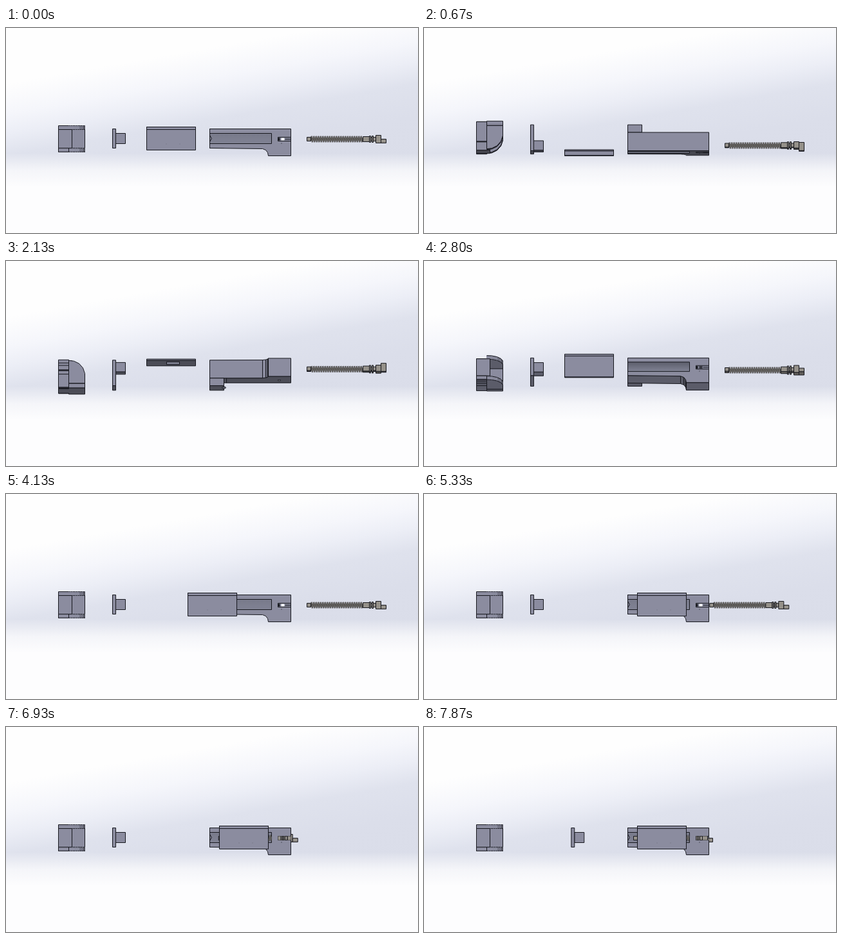
Recreate the animation shown at these times as an HTML page with a canvas. Size 640 by 320 pixels, loop 8000 ms.

```html
<!DOCTYPE html>
<html lang="en">
<head>
<meta charset="utf-8">
<title>Exploded assembly</title>
<style>
html, body { margin: 0; width: 100%; height: 100%; overflow: hidden; }
body {
  background:
    linear-gradient(180deg, #fdfdfe00 195px, #fdfdfebb 222px, #fdfdfe 248px),
    linear-gradient(170deg, #fefefe 20%, #f5f6fb 31%, #eceef6 38%, #dfe2ed 46%, #dbdeea 58%, #d9dce8 100%);
}
canvas { display: block; }
</style>
</head>
<body>
<canvas id="stage" width="640" height="320"></canvas>
<script>
const ctx = document.getElementById('stage').getContext('2d');
const STEP = 8000 / 60, AXIS = 175.5, INK = '#17181e';
const STEEL = [149, 151, 171], BRASS = [160, 156, 148];
let cos = 1, sin = 0;

// The parts turn about a horizontal axis; z points at the viewer.
const py = (y, z) => AXIS + (y + 0.5) * cos + z * sin;
const pz = (y, z) => z * cos - (y + 0.5) * sin;

// Faces of a polygon extruded along z (polygon in x,y) or y (polygon in x,z).
function prism(poly, near, far, axis = 'z', smooth = false) {
  const at = ([x, u], v) => axis === 'z' ? [x, u, v] : [x, v, u];
  const faces = [
    { pts: poly.map(p => at(p, near)) },
    { pts: poly.map(p => at(p, far)).reverse() }
  ];
  poly.forEach((p, i) => {
    const q = poly[(i + 1) % poly.length];
    faces.push({ pts: [at(q, near), at(p, near), at(p, far), at(q, far)], smooth });
  });
  return faces;
}
const box = (x0, x1, y0, y1, z0, z1) =>
  prism([[x0, y0], [x1, y0], [x1, y1], [x0, y1]], z1, z0);

const curve = [[97, -20], [122, -20], [122, -4], [119, 5], [113, 12], [105, 16], [97, 17]];
const cap = [
  prism([[81, -18], [97, -18], [97, -24], [122, -24], [122, 17], [97, 17], [97, 11], [81, 11]],
    -20, -27),
  prism(curve, -24, -18, 'y', true),
  box(81, 102, -18, 11, -20, 18),
  prism(curve, 11, 17, 'y', true),
  box(81, 97, -24, -18, -26, 5),
  box(81, 97, 11, 17, 13, 18),
  box(81, 97, 11, 17, 2, 9),
  box(81, 97, 11, 17, -26, -5)
].flat();
const plug = [box(165, 170, -19, 11, -22, 19), box(170, 185, -12, 4, 2, 17)].flat();
const sleeve = [box(218, 294, -22, 14, 18, 20), box(218, 294, -22, -18, 20, 27)].flat();
const body = [
  prism([[316, -19], [442, -19], [442, 23], [407, 23], [406, 18], [403, 14],
    [398, 12], [316, 11]], 19, -10),
  box(316, 338, -19, 11, -22, -10)
].flat();
const pin = [
  box(467, 473, -6, 0, 5, 11),
  box(554, 564, -7, 1, 4, 12),
  box(564, 566, -8, 2, 3, 13),
  box(566, 568, -6, 0, 5, 11),
  box(568, 570, -8, 2, 3, 13),
  box(570, 574, -6, 0, 5, 11),
  box(574, 582, -9, 3, 3, 13),
  box(582, 590, -3, 3, 3, 16)
].flat();

function tracePath(pts) {
  ctx.beginPath();
  pts.forEach(([x, y]) => ctx.lineTo(x, y));
}

function drawFaces(faces, tint = STEEL) {
  const seen = [];
  for (const { pts, smooth } of faces) {
    const p = pts.map(([x, y, z]) => [x, py(y, z), pz(y, z)]);
    let nx = 0, ny = 0, nz = 0, depth = 0;
    p.forEach((a, i) => {
      const b = p[(i + 1) % p.length];
      nx += a[1] * b[2] - b[1] * a[2];
      ny += a[2] * b[0] - b[2] * a[0];
      nz += a[0] * b[1] - b[0] * a[1];
      depth += a[2] / p.length;
    });
    const len = Math.hypot(nx, ny, nz);
    if (nz / len > 0.01) seen.push({ p, smooth, depth, up: -ny / len, face: nz / len });
  }
  seen.sort((a, b) => a.depth - b.depth);
  for (const { p, smooth, up, face } of seen) {
    const k = Math.min(0.93, 0.36 + 0.62 * face + 0.1 * Math.max(0, up));
    const fill = `rgb(${tint.map(c => Math.round(c * k))})`;
    tracePath(p);
    ctx.closePath();
    ctx.fillStyle = fill;
    ctx.fill();
    ctx.strokeStyle = smooth ? fill : INK;
    ctx.stroke();
    if (smooth) {
      ctx.strokeStyle = INK;
      if (sin === 0) ctx.setLineDash([2, 1]);
      for (const i of [0, 2]) {
        tracePath([p[i], p[i + 1]]);
        ctx.stroke();
      }
      ctx.setLineDash([]);
    }
  }
}

// Flat details lying on a plane of constant z.
function panel(x0, x1, y0, y1, z, from, to = from) {
  const a = py(y0, z), b = py(y1, z);
  const g = ctx.createLinearGradient(0, a, 0, b);
  g.addColorStop(0, from);
  g.addColorStop(1, to);
  ctx.fillStyle = g;
  ctx.strokeStyle = INK;
  ctx.fillRect(x0, a, x1 - x0, b - a);
  ctx.strokeRect(x0, a, x1 - x0, b - a);
}
function line(z, ...pts) {
  tracePath(pts.map(([x, y]) => [x, py(y, z)]));
  ctx.strokeStyle = INK;
  ctx.stroke();
}
function disc(x, y, z, rx, ry, fill) {
  ctx.beginPath();
  ctx.ellipse(x, py(y, z), rx, ry * Math.abs(cos), 0, 0, 7);
  ctx.fillStyle = fill;
  ctx.fill();
  ctx.strokeStyle = INK;
  ctx.stroke();
}

function drawBody() {
  drawFaces(body);
  if (cos > 0.05) {
    panel(316, 412, -12, 4, 19, sin === 0 ? '#787a8a' : '#5c5e6b', '#808294');
    if (sin === 0) line(19, [316, -9], [319, -4], [316, 1]);
    panel(422, 442, -6, 0, 19, '#85879a');
    ctx.fillStyle = sin === 0 ? '#f4f5f9' : '#33343c';
    ctx.fillRect(427, py(-5, 19), 5, 4 * cos);
    line(19, [433, -3], [442, -3]);
    ctx.fillStyle = INK;
    ctx.fillRect(422, py(-5, 19), 3, 4 * cos);
    ctx.fillRect(427, py(3, 19), 1, 1);
  } else if (cos < -0.05) {
    line(-10, [342, -19], [342, 11]);
    disc(338, -2, -22, 3, 6, '#686a78');
    disc(424, -3, -10, 2.5, 2.5, '#f4f5f9');
  }
}

function drawSleeve(dx) {
  ctx.save();
  ctx.translate(dx, 0);
  drawFaces(sleeve);
  if (cos < -0.05) panel(249, 269, 5, -13, 18, '#6c6e7c', '#858799');
  else if (sin === 0) {
    ctx.fillStyle = '#55576488';
    ctx.fillRect(248, 180, 1, 1);
    ctx.fillRect(269, 180, 1, 1);
  }
  ctx.restore();
}

function drawPin(dx) {
  ctx.save();
  // Inside the body it shows only through the channel and the slot.
  ctx.beginPath();
  ctx.rect(316, 164, 96, 16);
  ctx.rect(422, 170, 20, 6);
  ctx.rect(442.5, 0, 200, 320);
  ctx.clip();
  ctx.translate(dx, 0);
  const mid = py(-3, 8);
  ctx.fillStyle = '#7d7a74';
  ctx.fillRect(473, mid - 2.5, 81, 5);
  for (const [color, width] of [['#26262a', 2.4], ['#a7a39a', 0.8]]) {
    ctx.strokeStyle = color;
    ctx.lineWidth = width;
    ctx.beginPath();
    for (let x = 474; x < 554; x += 3.5) {
      ctx.moveTo(x, mid - 4.8);
      ctx.lineTo(x + 1.6, mid + 4.8);
    }
    ctx.stroke();
  }
  ctx.lineWidth = 1;
  drawFaces(pin, BRASS);
  ctx.restore();
}

// Progress of a linear move between two times in seconds.
const ramp = (s, from, to) => Math.min(1, Math.max(0, (s - from) / (to - from)));

function frame(now) {
  const s = Math.floor((now % 8000 + 4) / STEP) % 60 * STEP / 1000;
  const turn = s < 3 ? s / 3 * 2 * Math.PI : 0;
  cos = Math.cos(turn);
  sin = Math.sin(turn);
  ctx.setTransform(1, 0, 0, 1, 0, 0);
  ctx.clearRect(0, 0, 640, 320);
  ctx.translate(0.5, 0.5);
  ctx.lineWidth = 1;
  ctx.lineJoin = 'round';

  drawFaces(cap);
  drawBody();
  drawPin(-142 * ramp(s, 5, 7));
  drawSleeve(113 * ramp(s, 3, 5));
  ctx.translate(73 * ramp(s, 7, 8), 0);
  drawFaces(plug);
}

const start = performance.now();
(function loop() {
  frame(performance.now() - start);
  requestAnimationFrame(loop);
})();
</script>
</body>
</html>
```
